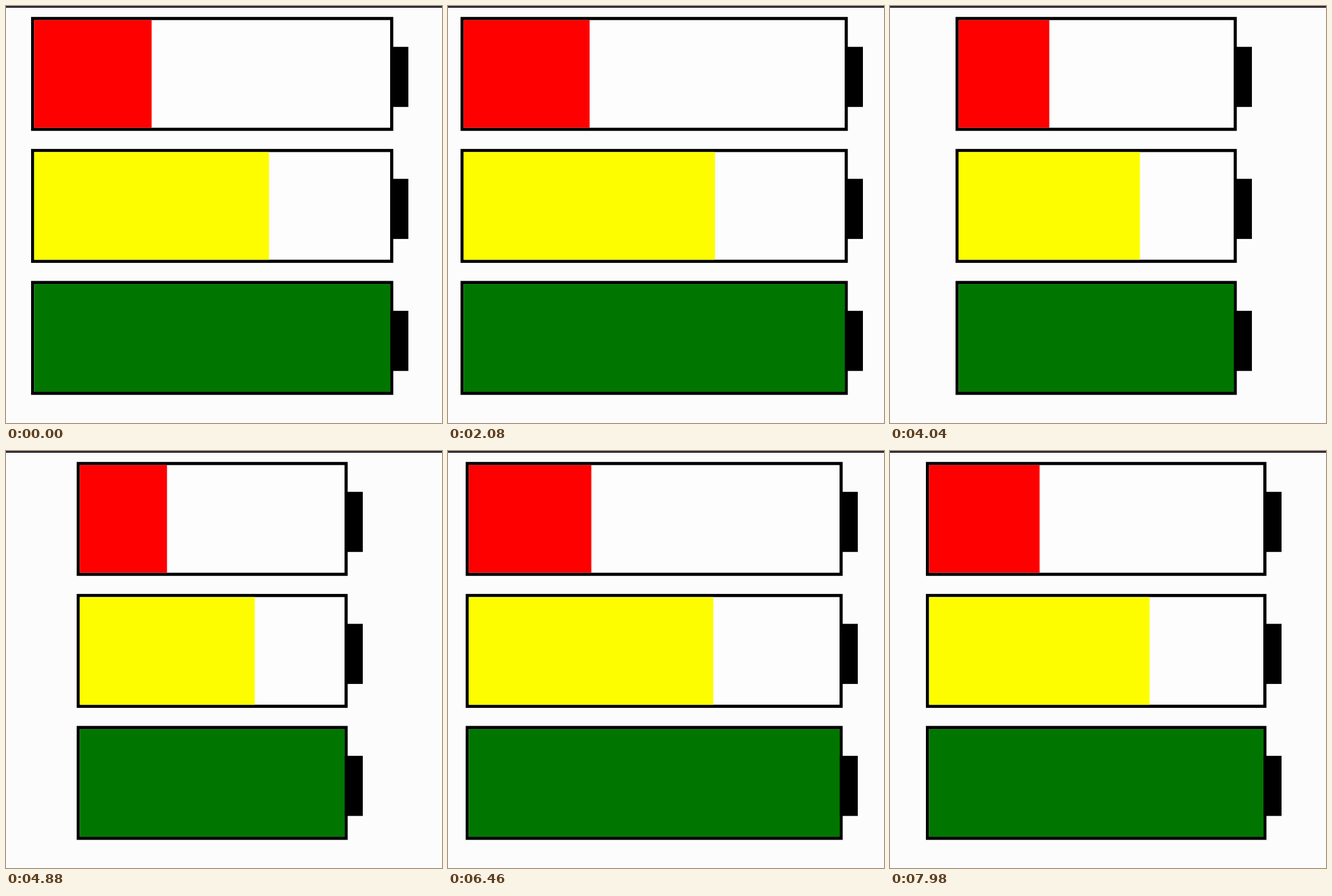
Write an HTML page with a canvas that moves like this. It is 765x732 px and loops after 8 s.

```html
<!DOCTYPE html>
<html lang="en">
<head>
<meta charset="utf-8">
<title>Battery levels</title>
<style>
  html, body { margin: 0; width: 100%; height: 100%; overflow: hidden; background: #fcfcfc; }
  canvas { display: block; }
</style>
</head>
<body>
<canvas id="stage" width="765" height="732"></canvas>
<script>
const ctx = document.getElementById('stage').getContext('2d');
const LOOP = 8000;
const BORDER = 5.5;
const HEIGHT = 200;
const WIDE = 731, NARROW = 625.5;
const batteries = [
  { level: 0.33, color: '#fe0000' },
  { level: 0.66, color: '#fdfd00' },
  { level: 1, color: '#007600' }
];

// Turning points of the swing: step and right edge of the terminal.
const turns = [
  { step: -18, right: WIDE },
  { step: 16, right: 686 },
  { step: 50, right: WIDE },
  { step: 96, right: NARROW },
  { step: 104, right: NARROW },
  { step: 150, right: WIDE },
  { step: 196, right: NARROW }
];

const easeInOut = t => t < 0.5 ? 2 * t * t : 1 - 2 * (1 - t) ** 2;

// Steps last 20, 100 and 20 ms in turn.
function stepAt(ms) {
  const phase = ms % 140;
  return Math.floor(ms / 140) * 3 + (phase < 20 ? 0 : phase < 120 ? 1 : 2);
}

function rightEdge(step) {
  const i = turns.findIndex(turn => turn.step > step);
  const from = turns[i - 1], to = turns[i];
  const t = (step - from.step) / (to.step - from.step);
  return from.right + (to.right - from.right) * easeInOut(t);
}

function rect(color, x, y, w, h) {
  ctx.fillStyle = color;
  ctx.fillRect(x, y, w, h);
}

function drawBattery({ level, color }, top, left, right) {
  const width = right - 26.5 - left;
  const inner = width - 2 * BORDER;
  const innerHeight = HEIGHT - 2 * BORDER;
  rect('#000', left, top, width, HEIGHT);
  rect('#fcfdfc', left + BORDER, top + BORDER, inner, innerHeight);
  rect(color, left + BORDER, top + BORDER, Math.round(inner * level), innerHeight);
  rect('#000', right - 31.5, top + 52.5, 31.5, 105.5);
}

function draw(ms) {
  const right = Math.round(rightEdge(stepAt(ms)));
  const left = 750 - right;
  rect('#fcfcfc', 0, 0, 765, 732);
  rect('#332e3a', 0, 0, 765, 2);
  rect('#0c0a10', 0, 2, 765, 1);
  batteries.forEach((battery, i) => drawBattery(battery, 19.2 + i * 231.7, left, right));
}

const start = performance.now();
function tick() {
  draw((performance.now() - start) % LOOP);
  requestAnimationFrame(tick);
}
tick();
</script>
</body>
</html>
```
